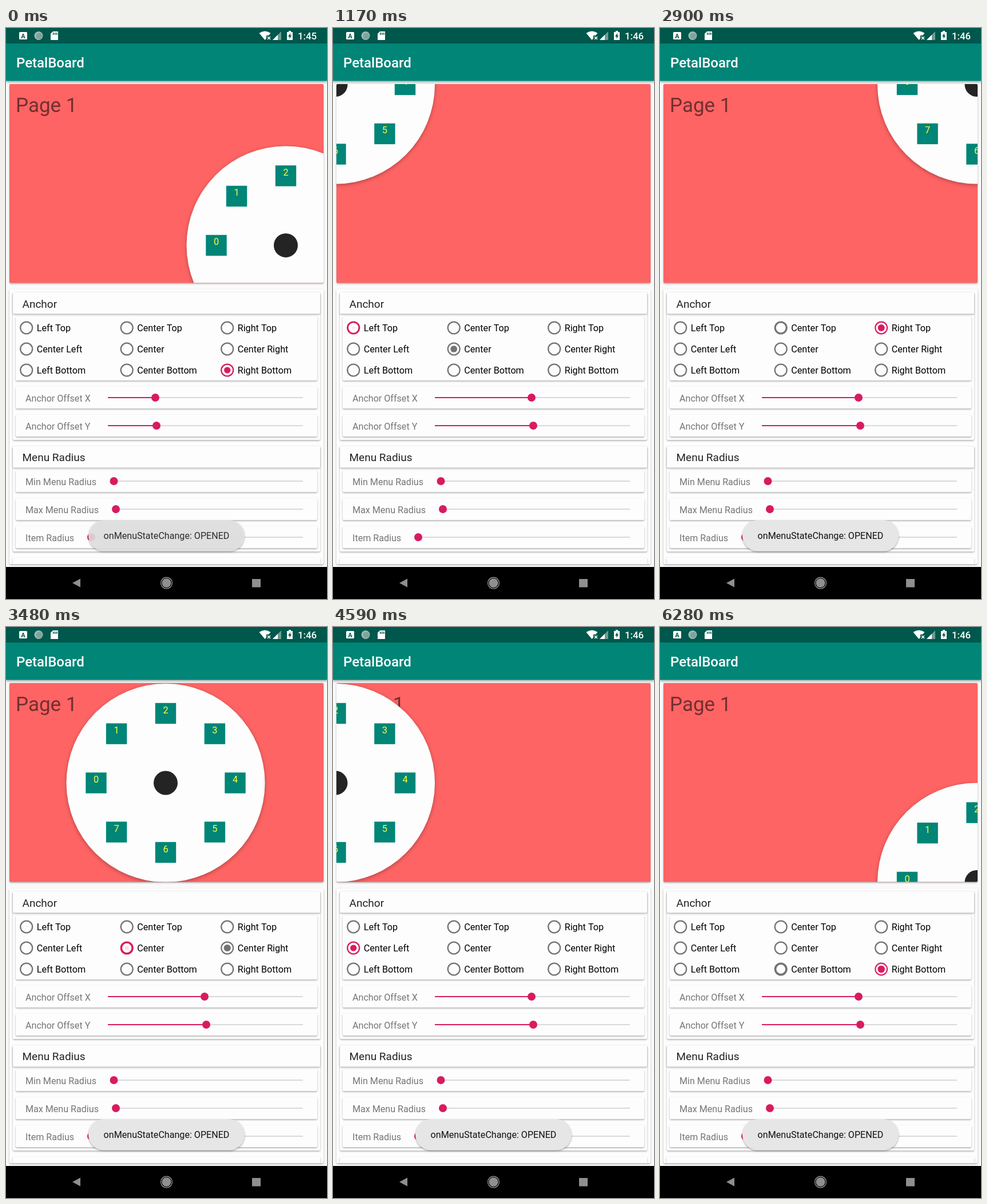
Animation, 561 px wide and 998 px high, one loop 6.32 s. Source, as an HTML page with a canvas:

```html
<!DOCTYPE html>
<html lang="en">
<head>
<meta charset="utf-8">
<style>
  html, body { margin: 0; width: 100%; height: 100%; overflow: hidden; background: #fafafa; }
  canvas { display: block; }
</style>
</head>
<body>
<canvas id="stage" width="561" height="998"></canvas>
<script>
const c = document.getElementById('stage').getContext('2d');
const LOOP = 6320;
const PINK = '#d81b60', GREY = '#737373', TEAL = '#008577', PAPER = '#fdfdfd';
const ROWS = ['Top', '', 'Bottom'], COLS = ['Left', 'Center', 'Right'];

// Anchor selections as [time, column, row]
const PICKS = [
  [-2000, 2, 2], [640, 1, 1], [1160, 0, 0], [1750, 1, 0], [2500, 2, 0],
  [3000, 2, 1], [3460, 1, 1], [4030, 0, 1], [4640, 0, 2], [5250, 1, 2], [5910, 2, 2]
];

const clamp = x => Math.max(0, Math.min(1, x));
const mix = (a, b, p) => a + (b - a) * p;
const ramp = (t, from, to) => clamp((t - from) / (to - from));
const smooth = p => p * p * (3 - 2 * p);
const easeOut = p => 1 - (1 - p) ** 2;

function text(s, x, y, size, color, align = 'left', weight = 400) {
  c.font = `${weight} ${size}px Roboto, sans-serif`;
  c.textAlign = align;
  c.fillStyle = color;
  c.fillText(s, x, y);
}

function rect(x, y, w, h, color) {
  c.fillStyle = color;
  c.fillRect(x, y, w, h);
}

function disc(x, y, r, color) {
  c.fillStyle = color;
  c.beginPath();
  c.arc(x, y, Math.max(0, r), 0, 7);
  c.fill();
}

function ring(x, y, outer, inner, color) {
  c.strokeStyle = color;
  c.lineWidth = outer - inner;
  c.beginPath();
  c.arc(x, y, (outer + inner) / 2, 0, 7);
  c.stroke();
}

function poly(color, ...pts) {
  c.fillStyle = color;
  c.beginPath();
  for (let i = 0; i < pts.length; i += 2) c.lineTo(pts[i], pts[i + 1]);
  c.fill();
}

function shadow(blur, y, alpha) {
  c.shadowBlur = blur;
  c.shadowOffsetY = y;
  c.shadowColor = `rgba(0,0,0,${alpha})`;
}

function card(x1, y1, x2, y2, color = PAPER, r = 2) {
  c.save();
  shadow(3, 1.5, .32);
  c.fillStyle = color;
  c.beginPath();
  c.roundRect(x1, y1, x2 - x1, y2 - y1, r);
  c.fill();
  c.restore();
}

function slider(label, y, start, value) {
  card(17, y - 19, 544, y + 19);
  text(label, 34, y + 6.5, 16.1, '#757575');
  rect(start, y - 1, 519 - start, 2, '#d9d9d9');
  rect(start, y - 1, value - start, 2, PINK);
  disc(value, y, 7, PINK);
}

function statusBar(t) {
  rect(0, 0, 561, 27, '#00574b');
  c.fillStyle = '#fff';
  c.beginPath();
  c.roundRect(23, 7, 14, 13, 1.5);
  c.fill();
  text('A', 30, 17.5, 11, '#00574b', 'center', 700);
  disc(57, 13.5, 7.5, '#9fb9b4');
  disc(58, 14, 5.5, '#7fa49d');
  poly('#fff', 82, 6, 91, 6, 91, 21, 78, 21, 78, 10);
  for (const x of [82, 85, 88]) rect(x, 8, 1.5, 4, '#00574b');

  c.fillStyle = '#fff';
  c.beginPath();
  c.moveTo(452.5, 21);
  c.lineTo(442.5, 9);
  c.quadraticCurveTo(452.5, 2, 462.5, 9);
  c.lineTo(459, 13);
  c.lineTo(455, 13);
  c.lineTo(455, 18);
  c.fill();
  c.strokeStyle = '#fff';
  c.lineWidth = 1.5;
  c.beginPath();
  c.moveTo(457, 15); c.lineTo(462, 20);
  c.moveTo(462, 15); c.lineTo(457, 20);
  c.stroke();
  poly('#6d9c94', 481, 6, 481, 21, 466, 21);
  poly('#fff', 475, 12, 475, 21, 466, 21);
  rect(491, 7, 10, 14, '#fff');
  rect(494, 5, 4, 2, '#fff');
  poly('#00574b', 497, 9, 493, 15, 495.5, 15, 495.5, 19, 499, 13, 497, 13);
  text(t < 420 ? '1:45' : '1:46', 543, 20, 16.8, '#fff', 'right', 500);
}

function appBar() {
  c.save();
  shadow(4, 2, .3);
  rect(0, 27, 561, 65.5, TEAL);
  c.restore();
  text('PetalBoard', 18, 69, 24, '#fff', 'left', 500);
}

function wheel(x, y) {
  c.save();
  shadow(7, 2, .3);
  disc(x, y, 173.5, PAPER);
  c.restore();
  for (let i = 0; i < 8; i++) {
    const a = Math.PI + i * Math.PI / 4;
    const ix = x + 121.5 * Math.cos(a), iy = y + 121.5 * Math.sin(a);
    rect(ix - 18.2, iy - 18.2, 36.4, 36.4, TEAL);
    text(i, ix, iy - .5, 16.4, '#ffff3c', 'center');
  }
  disc(x, y, 21, '#242424');
}

function page(pick, sx, sy) {
  card(6, 98, 555, 445.5, '#ff6464');
  c.save();
  c.beginPath();
  c.roundRect(6, 98, 549, 347.5, 2);
  c.clip();
  text('Page 1', 17, 147, 35, '#742f2f');
  wheel(4.5 + 274.5 * pick[1] + (sx - 347) * .75,
        99 + 173.5 * pick[2] + (sy - 350) * .76);
  c.restore();
}

function radio(x, y, on, age) {
  const color = on ? PINK : GREY;
  const fill = ramp(age, 0, 170), settle = easeOut(ramp(age, 170, 500));
  if (on && age < 320) {
    c.globalAlpha = .13 * (1 - ramp(age, 180, 320));
    disc(x, y, 21 * ramp(age, 0, 120), PINK);
    c.globalAlpha = 1;
  }
  if (on) {
    if (age < 170) ring(x, y, 11.6, 9.3 * (1 - fill), color);
    else {
      ring(x, y, mix(10.5, 11.6, settle), mix(9.5, 9.3, settle), color);
      disc(x, y, mix(10, 5.6, settle), color);
    }
  } else if (age < 170) {
    ring(x, y, mix(11.6, 11, fill), 9.3, color);
    disc(x, y, mix(5.6, 9.6, fill), color);
  } else ring(x, y, mix(11, 11.6, settle), 9.3 * settle, color);
}

function anchors(t, pick, previous) {
  for (let row = 0; row < 3; row++) for (let col = 0; col < 3; col++) {
    const x = 35.7 + 175.5 * col, y = 524 + 37 * row;
    const is = p => p && p[1] === col && p[2] === row;
    radio(x, y, is(pick), is(pick) || is(previous) ? t - pick[0] : 1e4);
    const name = row === 1 ? ['Center Left', 'Center', 'Center Right'][col]
                           : COLS[col] + ' ' + ROWS[row];
    text(name, x + 18, y + 6, 16.2, '#000');
  }
}

function toast(t) {
  const alpha = t < 700 ? .87 * (1 - ramp(t, 20, 300)) : ramp(t, 1250, 1430);
  if (!alpha) return;
  c.globalAlpha = alpha;
  card(144, 860, 417, 914.5, '#e6e6e6', 27);
  text('onMenuStateChange: OPENED', 280.5, 893, 16.1, '#111', 'center');
  c.globalAlpha = 1;
}

function navBar() {
  rect(0, 942, 561, 56, '#000');
  poly('#8f8f8f', 116, 970, 130, 962.5, 130, 977.5);
  disc(280.5, 970, 8, '#8f8f8f');
  ring(280.5, 970, 10.5, 9.3, '#a5a5a5');
  rect(430, 963, 15, 14.5, '#8f8f8f');
}

function draw(t) {
  const n = PICKS.findLastIndex(p => p[0] <= t), pick = PICKS[n];
  const sx = mix(261, 347, smooth(ramp(t, 120, 320)));
  const sy = mix(263, 350, smooth(ramp(t, 380, 580)));

  rect(0, 0, 561, 998, '#fafafa');
  statusBar(t);
  appBar();
  page(pick, sx, sy);

  card(6, 457, 555, 937);
  card(12, 462, 549, 720);
  card(12, 462, 549, 499.5);
  text('Anchor', 28.5, 489, 19, '#212121');
  card(17, 504, 544, 616);
  anchors(t, pick, PICKS[n - 1]);
  slider('Anchor Offset X', 646, 178, sx);
  slider('Anchor Offset Y', 695, 178, sy);

  card(12, 731, 549, 915);
  card(12, 731, 549, 768.5);
  text('Menu Radius', 28.5, 757, 19, '#212121');
  slider('Min Menu Radius', 792, 188.5, 188.5);
  slider('Max Menu Radius', 841, 192, 192);
  slider('Item Radius', 890, 149, 149);
  c.save();
  c.beginPath();
  c.rect(6, 922, 549, 14);
  c.clip();
  card(12, 926, 549, 950);
  c.restore();

  navBar();
  toast(t);
}

const begin = performance.now();
function tick() {
  draw((performance.now() - begin) % LOOP);
  requestAnimationFrame(tick);
}
tick();
</script>
</body>
</html>
```
